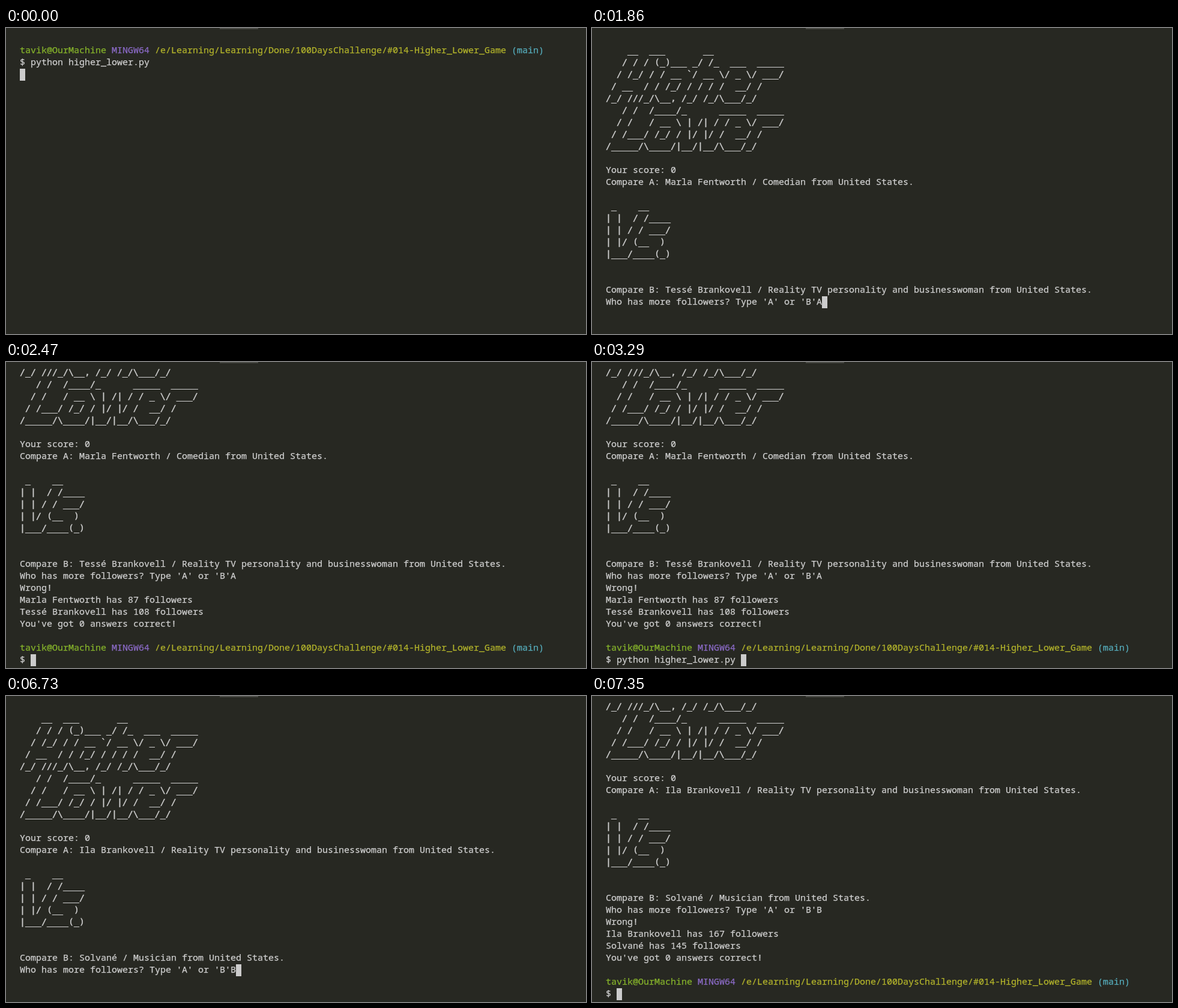
Write an HTML page that moves like this. It is 966 by 511 pixels and loops after 8 s.

```html
<!DOCTYPE html>
<html lang="en">
<head>
<meta charset="utf-8">
<title>Higher Lower in a terminal</title>
<style>
  html, body { margin: 0; width: 100%; height: 100%; overflow: hidden; background: #272822; }
  svg { display: block; width: 966px; height: 511px; }
  text {
    font: 15px "Noto Sans Mono", monospace;
    font-variant-ligatures: none;
    white-space: pre;
    color: #d0d0d0;
  }
  text, tspan { fill: currentColor; stroke: currentColor; stroke-width: 0.25px; }
  text.art { font: 14.95px "DejaVu Sans Mono", monospace; stroke-width: 0.4px; }
  .user { color: #86b42b; }
  .system { color: #8c6bc8; }
  .path { color: #b3b42b; }
  .branch { color: #56adbc; }
</style>
</head>
<body>
<svg viewBox="0 0 966 511">
  <rect width="966" height="511" fill="#272822"/>
  <rect x="356" y="0" width="64" height="2" fill="#4a4b46"/>
  <g id="screen"></g>
  <rect id="cursor" width="9" height="20" fill="#ccc"/>
</svg>
<script>
const LOOP = 8000, ROWS = 25, LINE = 20, CHAR = 9, LEFT = 23, TOP = 8, BASELINE = 14;
const screen = document.getElementById('screen');
const cursor = document.getElementById('cursor');

const art = lines => lines.map(text => ({ text, art: true }));
const title = art([
  "    __  ___       __",
  "   / / / (_)___ _/ /_  ___  _____",
  "  / /_/ / / __ `/ __ \\/ _ \\/ ___/",
  " / __  / / /_/ / / / /  __/ /",
  "/_/ ///_/\\__, /_/ /_/\\___/_/",
  "   / /  /____/_      _____  _____",
  "  / /   / __ \\ | /| / / _ \\/ ___/",
  " / /___/ /_/ / |/ |/ /  __/ /",
  "/_____/\\____/|__/|__/\\___/_/"
]);
const versus = art([
  " _    __",
  "| |  / /____",
  "| | / / ___/",
  "| |/ (__  )",
  "|___/____(_)"
]);

const prompt = [
  ['user', 'tavik@OurMachine'],
  ['system', ' MINGW64'],
  ['path', ' /e/Learning/Learning/Done/100DaysChallenge/#014-Higher_Lower_Game'],
  ['branch', ' (main)']
];
const command = '$ python higher_lower.py';
const celebrity = 'Reality TV personality and businesswoman';
const marla = { name: 'Marla Fentworth', job: 'Comedian', followers: 87 };
const tesse = { name: 'Tessé Brankovell', job: celebrity, followers: 108 };
const ila = { name: 'Ila Brankovell', job: celebrity, followers: 167 };
const solvane = { name: 'Solvané', job: 'Musician', followers: 145 };

const describe = p => `${p.name} / ${p.job} from United States.`;
const count = p => `${p.name} has ${p.followers} followers`;

const question = (a, b, answer = '') => [
  '', ...title, '',
  'Your score: 0',
  'Compare A: ' + describe(a), '',
  ...versus, '', '',
  'Compare B: ' + describe(b),
  "Who has more followers? Type 'A' or 'B'" + answer
];
const result = (a, b, answer) => [
  ...question(a, b, answer),
  'Wrong!', count(a), count(b),
  "You've got 0 answers correct!", ''
];

const first = result(marla, tesse, 'A');
const second = result(ila, solvane, 'B');
const steps = [
  [0, ['', prompt, command, '']],
  [220, question(marla, tesse)],
  [1860, question(marla, tesse, 'A')],
  [2270, first],
  [2470, [...first, prompt, '$ ']],
  [3290, [...first, prompt, command + ' ']],
  [4300, question(ila, solvane)],
  [6730, question(ila, solvane, 'B')],
  [7130, second],
  [7350, [...second, prompt, '$ ']]
];

function add(parent, tag, text, className) {
  const node = document.createElementNS('http://www.w3.org/2000/svg', tag);
  node.textContent = text;
  if (className) node.setAttribute('class', className);
  return parent.appendChild(node);
}

function drawLine(line, row) {
  const node = add(screen, 'text', line.text ?? (Array.isArray(line) ? '' : line), line.art && 'art');
  node.setAttribute('x', LEFT);
  node.setAttribute('y', TOP + row * LINE + BASELINE);
  if (Array.isArray(line)) line.forEach(([name, text]) => add(node, 'tspan', text, name));
}

// The terminal shows the last rows and puts the cursor after the final line.
function drawScreen(lines) {
  const visible = lines.slice(-ROWS);
  screen.replaceChildren();
  visible.forEach(drawLine);
  cursor.setAttribute('x', LEFT + visible.at(-1).length * CHAR);
  cursor.setAttribute('y', TOP + (visible.length - 1) * LINE);
}

let shown;
const start = performance.now();
function update(now) {
  const time = Math.max(0, now - start) % LOOP;
  const step = steps.findLast(([from]) => from <= time);
  if (step !== shown) drawScreen((shown = step)[1]);
  requestAnimationFrame(update);
}
update(start);
</script>
</body>
</html>
```
